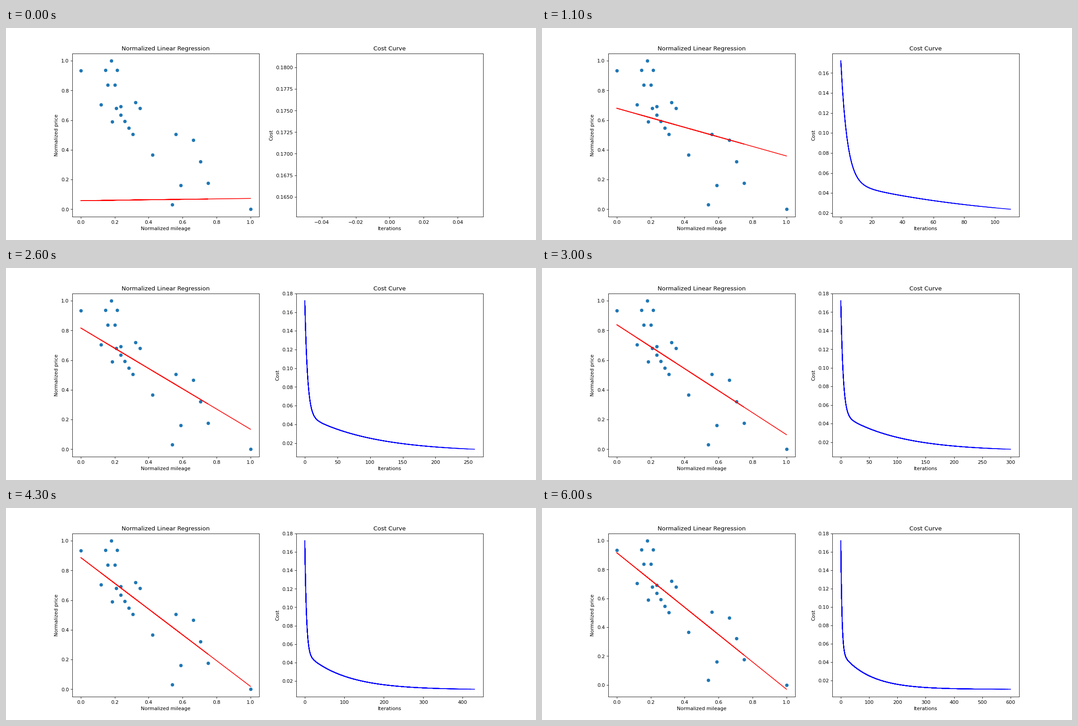
Animation, 1183 px wide and 473 px high, one loop 6.1 s. Source, as a matplotlib script:

```python
import numpy as np
import matplotlib.pyplot as plt
from matplotlib.animation import FuncAnimation

FRAMES, STEP, RATE = 61, 10, 0.1


def run(start, end, count):
    """Evenly spaced points on a straight line."""
    return np.linspace(start, end, count)


def ring(center, radii, count):
    """Points spread around an ellipse, starting at its top."""
    angle = np.pi / 2 + np.arange(count) * 2 * np.pi / count
    return center + np.column_stack([np.cos(angle), np.sin(angle)]) * radii


def descend(x, y, count):
    """Return (intercept, slope) and cost after each gradient step."""
    a = b = 0.0
    thetas, costs = [], []
    for _ in range(count):
        err = a + b * x - y
        a, b = a - RATE * err.mean(), b - RATE * (err * x).mean()
        thetas.append((a, b))
        costs.append(((a + b * x - y) ** 2).mean() / 2)
    return thetas, costs


# A falling cloud: loose cars, three diagonals and a cluster at the top
points = np.vstack([
    [(1, 0), (0.538, 0.032), (0.588, 0.162), (0.423, 0.366),
     (0.56, 0.506), (0.185, 0.59), (0.323, 0.72), (0, 0.935)],
    run((0.749, 0.175), (0.663, 0.467), 3),
    run((0.307, 0.504), (0.21, 0.679), 5),
    run((0.12, 0.705), (0.35, 0.68), 3),
    ring((0.181, 0.91), (0.036, 0.09), 5),
])
x, y = points.T
thetas, costs = descend(x, y, (FRAMES - 1) * STEP + 1)

fig, (fit_ax, cost_ax) = plt.subplots(1, 2, figsize=(15, 6), dpi=78.87)

fit_ax.set(title="Normalized Linear Regression",
           xlabel="Normalized mileage", ylabel="Normalized price")
fit_ax.scatter(x, y)
fit_line, = fit_ax.plot(x, y, "r-")

# Each refresh lays a longer curve over the earlier ones
cost_ax.set(title="Cost Curve", xlabel="Iterations", ylabel="Cost")
curves = [cost_ax.plot(range(k * STEP + 1), costs[:k * STEP + 1], "b-")[0]
          for k in range(FRAMES)]


def rescale(ax, extra=None):
    ax.relim(visible_only=True)
    if extra is not None:
        ax.update_datalim(extra)
    ax.autoscale_view()


def update(i):
    a, b = thetas[i * STEP]
    fit_line.set_ydata(a + b * x)
    rescale(fit_ax, points)
    for k, curve in enumerate(curves):
        curve.set_visible(k <= i)
    rescale(cost_ax)
    return []


anim = FuncAnimation(fig, update, frames=FRAMES, interval=100,
                     init_func=lambda: [], repeat=True, repeat_delay=0)
plt.show()
```
